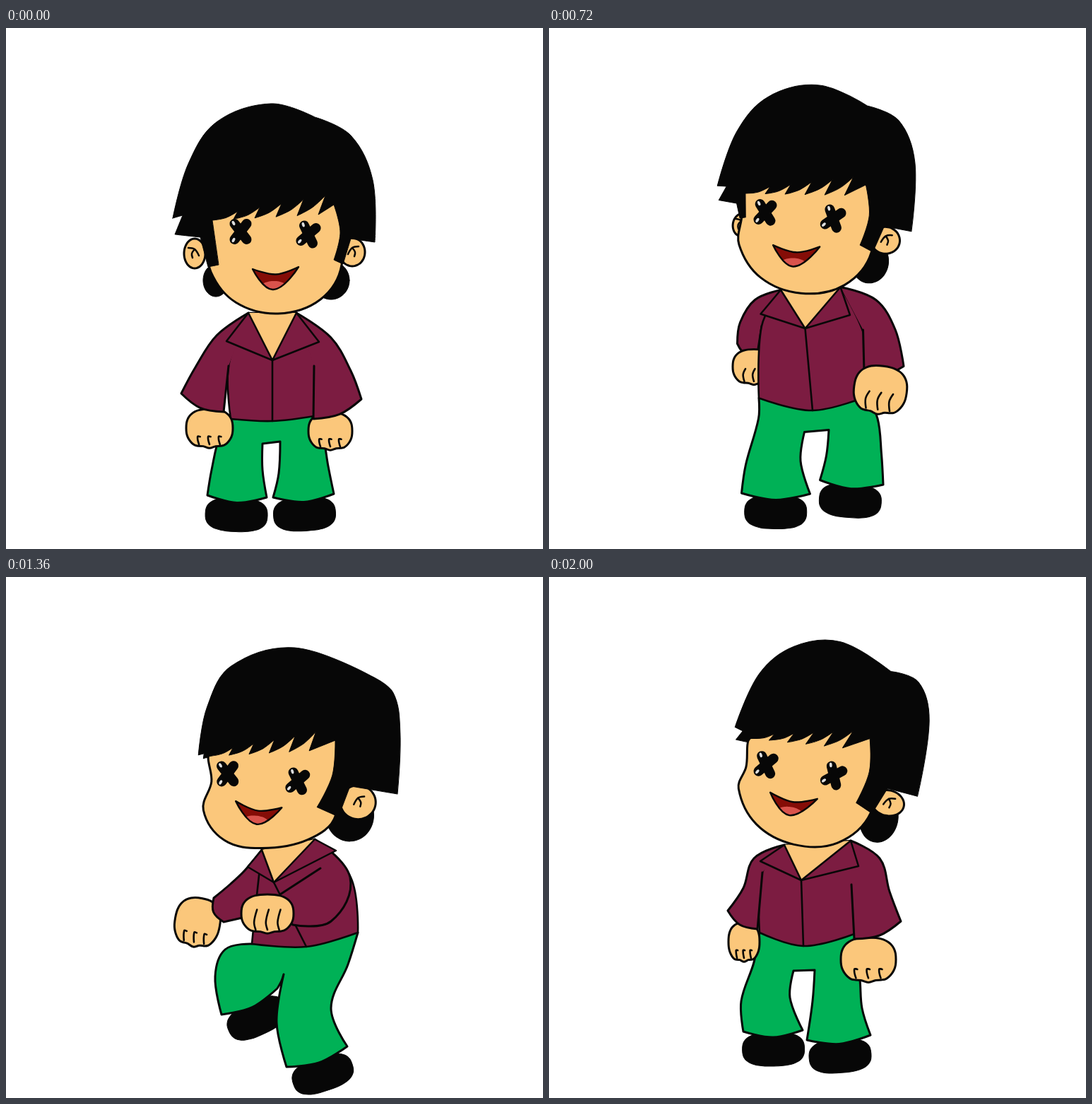
These frames come from a looping animation (760 px wide and 737 px high, 2080 ms). An HTML page with a canvas:

```html
<!DOCTYPE html>
<html lang="en">
<head>
<meta charset="utf-8">
<title>Dancing boy</title>
<style>
html, body { margin: 0; width: 100%; height: 100%; overflow: hidden; background: #fff; }
canvas { display: block; width: 100vw; height: 100vh; }
</style>
</head>
<body>
<canvas id="stage" width="760" height="737"></canvas>
<script>
const ctx = document.getElementById('stage').getContext('2d');
const INK = '#070707', SKIN = '#fbc77b', SHIRT = '#7c1c41', GREEN = '#00b156';
const LOOP = 2080, STEP = 80, PIVOT = [380, 280];

// Head rigs: key points as x, y pairs; ears and nape are x, y, rx, ry.
const front = {
  dome: [236, 269, 258, 192, 298, 133, 375, 107, 437, 126, 488, 152, 519, 215, 522, 303],
  burnR: [488, 298, 477, 334, 464, 328, 464, 250],
  fringe: [442, 264, 292, 272],
  burnL: [301, 335, 286, 338, 275, 296, 239, 292, 250, 265],
  face: [290, 262, 286, 300, 290, 345, 325, 388, 385, 404, 445, 384, 475, 335, 470, 240, 330, 225],
  earL: [267, 319, 15, 21], earR: [490, 317, 18, 20],
  napeL: [297, 357, 18, 23], napeR: [460, 357, 26, 27],
  eyes: [332, 288, 428, 292], mouth: [349, 341, 378, 370, 414, 338]
};
const low = {
  dome: [247, 262, 260, 195, 295, 137, 385, 112, 492, 153, 524, 178, 533, 235, 528, 321],
  burnR: [461, 309, 444, 352, 414, 338, 441, 244],
  fringe: [404, 258, 262, 264],
  burnL: [261, 265, 258, 266, 257, 266, 254, 267, 255, 260],
  face: [263, 255, 265, 300, 253, 340, 282, 383, 335, 395, 400, 384, 440, 350, 445, 240, 300, 225],
  earL: [282, 312, 8, 10], earR: [472, 332, 25, 24],
  napeL: [300, 330, 10, 10], napeR: [460, 350, 34, 37],
  eyes: [288, 289, 387, 301], mouth: [299, 328, 328, 361, 364, 338]
};
const high = {
  dome: [234, 246, 252, 165, 292, 117, 355, 97, 433, 123, 475, 130, 501, 180, 507, 288],
  burnR: [463, 286, 449, 325, 424, 315, 424, 222],
  fringe: [389, 243, 259, 257],
  burnL: [257, 261, 256, 262, 254, 263, 239, 263, 246, 249],
  face: [259, 250, 261, 298, 257, 330, 292, 374, 350, 391, 410, 376, 447, 325, 445, 225, 300, 220],
  earL: [280, 300, 8, 10], earR: [468, 306, 23, 18],
  napeL: [300, 320, 10, 10], napeR: [460, 330, 27, 34],
  eyes: [288, 289, 385, 284], mouth: [302, 326, 335, 352, 369, 321]
};

// Joints. tilt: x, y, degrees, slide of the features
// neck: left, V, right; hem: left, middle, right; arm: two outer points, cuff, cuff, armpit
// hand: x, y, rx, ry, degrees, fist; leg: thigh, knee, cuff, cuff, inner knee, crotch
const poses = [
  {
    head: front, tilt: [0, 0, 0, 0], behind: 0,
    neck: [343, 403, 377, 470, 411, 403], collar: [312, 443, 443, 444],
    back: [440, 440], hem: [318, 553, 377, 556, 436, 549],
    armL: [298, 435, 268, 480, 248, 517, 308, 543, 315, 478], handL: [288, 566, 33, 27, 0, 0],
    armR: [460, 438, 488, 485, 503, 525, 435, 553, 436, 478], handR: [459, 570, 31, 26, 0, 0],
    legL: [303, 575, 291, 625, 285, 661, 369, 664, 363, 625, 363, 588],
    legR: [448, 575, 456, 620, 464, 659, 378, 664, 386, 630, 388, 585]
  },
  {
    head: low, tilt: [0, 0, 0, 0], behind: 1,
    neck: [325, 396, 354, 436, 411, 383], collar: [308, 421, 419, 412],
    back: [478, 440], hem: [317, 517, 390, 528, 462, 526],
    armL: [300, 405, 278, 430, 258, 458, 268, 524, 323, 440], handL: [238, 492, 46, 35, 0, 1],
    armR: [465, 400, 480, 445, 437, 516, 390, 476, 440, 448], handR: [390, 512, 48, 37, 0, 1],
    legL: [285, 525, 261, 555, 259, 606, 350, 586, 352, 572, 362, 567],
    legR: [459, 560, 463, 625, 475, 668, 384, 670, 387, 620, 387, 572]
  },
  {
    head: high, tilt: [0, 0, 0, 0], behind: 1,
    neck: [318, 388, 343, 438, 400, 381], collar: [286, 417, 418, 416],
    back: [443, 450], hem: [290, 533, 368, 547, 443, 530],
    armL: [298, 391, 285, 408, 288, 435, 293, 440, 296, 430], handL: [325, 470, 18, 18, 0, 0],
    armR: [450, 396, 480, 428, 507, 487, 460, 518, 437, 434], handR: [480, 540, 31, 33, 0, 0],
    legL: [290, 560, 271, 620, 275, 671, 361, 657, 345, 615, 353, 582],
    legR: [448, 570, 441, 620, 444, 657, 364, 657, 369, 620, 387, 582]
  },
  {
    head: front, tilt: [1, -41, 11, -8], behind: 0,
    neck: [338, 353, 382, 412, 425, 352], collar: [313, 392, 434, 396],
    back: [452, 430], hem: [304, 514, 378, 535, 455, 513],
    armL: [285, 378, 256, 425, 245, 458, 297, 480, 306, 413], handL: [255, 488, 42, 31, 0, 1],
    armR: [475, 373, 500, 425, 497, 470, 432, 455, 452, 420], handR: [458, 483, 44, 34, 15, 1],
    legL: [303, 545, 286, 615, 270, 645, 378, 661, 367, 610, 370, 561],
    legR: [482, 535, 500, 585, 502, 635, 403, 622, 416, 590, 405, 555]
  },
  {
    head: low, tilt: [25.5, -12, -0.8, 0], behind: 1,
    neck: [362, 386, 379, 432, 437, 371], collar: [342, 410, 467, 387],
    back: [488, 425], hem: [348, 519, 425, 523, 498, 503],
    armL: [338, 415, 318, 434, 294, 454, 308, 488, 352, 478], handL: [271, 488, 32, 34, 10, 0],
    armR: [487, 425, 460, 487, 406, 492, 388, 449, 445, 412], handR: [370, 476, 37, 27, 0, 1],
    legL: [310, 527, 296, 565, 305, 619, 384, 582, 390, 571, 393, 562],
    legR: [484, 548, 460, 610, 483, 664, 397, 693, 383, 630, 393, 562]
  },
  {
    head: low, tilt: [7, -5.5, 0, 0], behind: 1,
    neck: [344, 388, 355, 431, 420, 377], collar: [320, 409, 415, 409],
    back: [468, 428], hem: [336, 492, 405, 520, 481, 501],
    armL: [312, 418, 293, 431, 272, 442, 285, 473, 336, 466], handL: [256, 470, 30, 25, 20, 0],
    armR: [441, 415, 432, 475, 385, 516, 325, 494, 393, 420], handR: [342, 525, 40, 32, 0, 1],
    legL: [290, 505, 273, 535, 271, 580, 345, 570, 348, 571, 352, 575],
    legR: [455, 562, 424, 605, 445, 635, 375, 680, 355, 640, 352, 580]
  },
  {
    head: high, tilt: [19, -4, 12, 0], behind: 0,
    neck: [333, 379, 357, 429, 427, 373], collar: [299, 402, 438, 409],
    back: [432, 440], hem: [298, 503, 360, 522, 432, 505],
    armL: [290, 398, 275, 440, 253, 472, 295, 498, 302, 418], handL: [276, 516, 22, 27, 0, 0],
    armR: [468, 398, 482, 445, 498, 487, 432, 512, 428, 435], handR: [452, 541, 39, 31, 0, 0],
    legL: [290, 545, 272, 600, 275, 643, 359, 641, 341, 595, 346, 557],
    legR: [440, 570, 443, 610, 455, 648, 365, 655, 373, 600, 376, 556]
  }
];

// time, pose, dx, dy
const keys = [
  [0, 0, 0, 0], [320, 1, 0, 0], [480, 2, 0, -5], [560, 2, 0, 0], [880, 3, 0, 0],
  [1120, 4, -4, 1], [1200, 4, 0, -6], [1360, 4, 0, 0], [1600, 5, -8, 3],
  [1760, 5, 0, 0], [2000, 6, 0, 0], [LOOP, 0, 0, 0]
];

const lerp = (a, b, u) => a + (b - a) * u;
const between = (p, q, u) => [lerp(p[0], q[0], u), lerp(p[1], q[1], u)];
const sharp = p => [p[0], p[1], true];
const pairs = list => list.flatMap((v, i) => i % 2 ? [] : [[v, list[i + 1]]]);

// Blend two rigs number by number.
function blend(a, b, u) {
  if (typeof a === 'number') return lerp(a, b, u);
  if (Array.isArray(a)) return a.map((v, i) => lerp(v, b[i], u));
  return Object.fromEntries(Object.keys(a).map(k => [k, blend(a[k], b[k], u)]));
}

// Middle of a line, pushed sideways by k.
function bulge(a, b, k) {
  const dx = b[0] - a[0], dy = b[1] - a[1], s = k / (Math.hypot(dx, dy) || 1);
  return [(a[0] + b[0]) / 2 - dy * s, (a[1] + b[1]) / 2 + dx * s];
}

// Smooth curve through points; sharp points have no tangent.
function trace(p, closed = true) {
  const n = p.length;
  const handle = (i, len) => {
    const q = p[i];
    if (q[2] || (!closed && (i === 0 || i === n - 1))) return q;
    const a = p[(i + n - 1) % n], b = p[(i + 1) % n];
    const k = len * 0.35 / (Math.hypot(b[0] - a[0], b[1] - a[1]) || 1);
    return [q[0] + (b[0] - a[0]) * k, q[1] + (b[1] - a[1]) * k];
  };
  ctx.beginPath();
  ctx.moveTo(p[0][0], p[0][1]);
  for (let i = 0; i < (closed ? n : n - 1); i++) {
    const j = (i + 1) % n, len = Math.hypot(p[j][0] - p[i][0], p[j][1] - p[i][1]);
    const b = handle(i, len), c = handle(j, -len);
    ctx.bezierCurveTo(b[0], b[1], c[0], c[1], p[j][0], p[j][1]);
  }
  if (closed) ctx.closePath();
}

function stroke(width) {
  ctx.lineWidth = width;
  ctx.stroke();
}

function shape(p, fill, width = 3, closed = true) {
  trace(p, closed);
  ctx.fillStyle = fill;
  ctx.fill();
  if (width) stroke(width);
}

function line(p, width) {
  trace(p, false);
  stroke(width);
}

// Rounded box with optional knuckles along its lower side.
function blob(rx, ry, power, knuckles = 0) {
  const soft = v => Math.sign(v) * Math.abs(v) ** power;
  return Array.from({ length: 32 }, (_, i) => {
    const a = i / 16 * Math.PI, x = soft(Math.cos(a)), y = soft(Math.sin(a));
    return [x * rx, y * ry * (1 + knuckles * Math.max(0, y) * (Math.abs(Math.cos(x * 4.7)) - 0.6))];
  });
}

function at(x, y, degrees, paint) {
  ctx.save();
  ctx.translate(x, y);
  ctx.rotate(degrees * Math.PI / 180);
  paint();
  ctx.restore();
}

const oval = ([x, y, rx, ry], fill, width) => at(x, y, 0, () => shape(blob(rx, ry, 1), fill, width));

function drawEar(ear, side) {
  oval(ear, SKIN, 3);
  at(ear[0], ear[1], 0, () => {
    line([[-6 * side, 3], [0, -6], [9 * side, -8]], 2.5);
    line([[0, -6], [4 * side, 0], [3 * side, 6]], 2.5);
  });
}

function drawEye(x, y, degrees) {
  at(x, y, degrees, () => {
    for (const s of [-1, 1]) line([[-8.5, -11 * s], [8.5, 11 * s]], 14);
    ctx.fillStyle = '#dedede';
    for (const s of [-1, 1]) {
      ctx.beginPath();
      ctx.ellipse(-10, 12 * s, 1.9, 3.4, 0.5 * s, 0, 7);
      ctx.fill();
    }
  });
}

function drawMouth(mouth) {
  const [l, b, r] = pairs(mouth);
  const lips = [sharp(l), bulge(l, r, 9), sharp(r), b];
  ctx.save();
  shape(lips, '#850d07', 0);
  ctx.clip();
  at(b[0], b[1] - 4, Math.atan2(r[1] - l[1], r[0] - l[0]) * 57.3, () => shape(blob(18, 8, 1), '#d9534c', 0));
  ctx.restore();
  trace(lips);
  stroke(2.4);
}

function hairPath(h) {
  const dome = pairs(h.dome).map((p, i) => i === 0 || i === 4 || i === 7 ? sharp(p) : p);
  const [ear, outer, inner, top] = pairs(h.burnR);
  const [first, last] = pairs(h.fringe);
  const locks = [];
  for (let i = 0; i < 5; i++) {
    const tip = between(first, last, i / 5), next = between(first, last, (i + 1) / 5);
    const notch = [tip[0] + 10 - i, tip[1] - 27 + 4 * i];
    locks.push(sharp(tip), sharp(notch), bulge(notch, next, -3));
  }
  return [...dome, sharp(ear), sharp(outer), sharp(inner), bulge(inner, top, 9), sharp(top),
    ...locks, sharp(last), ...pairs(h.burnL).map(sharp)];
}

function drawHead(h, [x, y, turn, slide]) {
  at(PIVOT[0] + x, PIVOT[1] + y, turn, () => {
    ctx.translate(-PIVOT[0], -PIVOT[1]);
    oval(h.napeL, INK, 1);
    oval(h.napeR, INK, 1);
    drawEar(h.earL, -1);
    drawEar(h.earR, 1);
    shape(pairs(h.face), SKIN);
    shape(hairPath(h), INK, 1);
    ctx.translate(slide, 0);
    drawEye(h.eyes[0], h.eyes[1], 0);
    drawEye(h.eyes[2], h.eyes[3], 12);
    drawMouth(h.mouth);
  });
}

function drawHand([x, y, rx, ry, turn, fist]) {
  at(x, y, turn, () => {
    shape(blob(rx, ry, 0.8, 0.12), SKIN);
    const from = lerp(0.45, -0.2, fist);
    for (const c of [-0.45, 0, 0.45]) {
      line([[(c + 0.05) * rx, from * ry], [(c - 0.06) * rx, 0.45 * ry], [c * rx, 0.85 * ry]], 2.6);
    }
  });
}

function drawArm(shoulder, arm, hand, side) {
  const [a, b, cuff, inner, pit] = pairs(arm);
  const sleeve = () => shape([shoulder, a, b, sharp(cuff), bulge(cuff, inner, -8 * side), sharp(inner), pit], SHIRT, 3, false);
  const fist = hand[5] >= 0.5;
  if (fist) sleeve();
  drawHand(hand);
  if (!fist) sleeve();
}

function drawShoe(l, r) {
  const [x, y] = bulge(l, r, 26);
  at(x, y, Math.atan2(r[1] - l[1], r[0] - l[0]) * 57.3, () => shape(blob(44, 24, 0.75), INK, 1));
}

function drawBody(p) {
  const [neckL, vee, neckR] = pairs(p.neck), [hemL, hem, hemR] = pairs(p.hem);
  const [tipL, tipR] = pairs(p.collar);
  const L = pairs(p.legL), R = pairs(p.legR);
  const leftArm = () => drawArm(neckL, p.armL, p.handL, -1);

  drawShoe(L[2], L[3]);
  drawShoe(R[3], R[2]);
  shape([
    sharp(hemL), L[0], L[1], sharp(L[2]), bulge(L[2], L[3], 9), sharp(L[3]), L[4], sharp(L[5]),
    sharp(R[5]), R[4], sharp(R[3]), bulge(R[3], R[2], 9), sharp(R[2]), R[1], R[0], sharp(hemR)
  ], GREEN);
  if (p.behind >= 0.5) leftArm();
  shape([sharp(neckL), pairs(p.armL)[4], sharp(hemL), hem, sharp(hemR), p.back, sharp(neckR)], SHIRT, 2.6);
  line([vee, hem], 2.6);
  if (p.behind < 0.5) leftArm();
  drawArm(neckR, p.armR, p.handR, 1);
  shape([neckL, vee, neckR].map(sharp), SKIN, 0);
  shape([neckL, tipL, vee].map(sharp), SHIRT, 2.5);
  shape([neckR, tipR, vee].map(sharp), SHIRT, 2.5);
}

function draw(now) {
  const t = Math.floor(now % LOOP / STEP) * STEP;
  const i = keys.findIndex((k, n) => t >= k[0] && t < keys[n + 1][0]);
  const from = keys[i], to = keys[i + 1];
  const u = (t - from[0]) / (to[0] - from[0]);
  const pose = blend(poses[from[1]], poses[to[1]], u);
  ctx.fillStyle = '#fff';
  ctx.fillRect(0, 0, 760, 737);
  ctx.save();
  ctx.strokeStyle = INK;
  ctx.lineCap = ctx.lineJoin = 'round';
  ctx.translate(lerp(from[2], to[2], u), lerp(from[3], to[3], u));
  drawBody(pose);
  drawHead(pose.head, pose.tilt);
  ctx.restore();
}

const start = performance.now();
function tick() {
  draw(performance.now() - start);
  requestAnimationFrame(tick);
}
tick();
</script>
</body>
</html>
```
